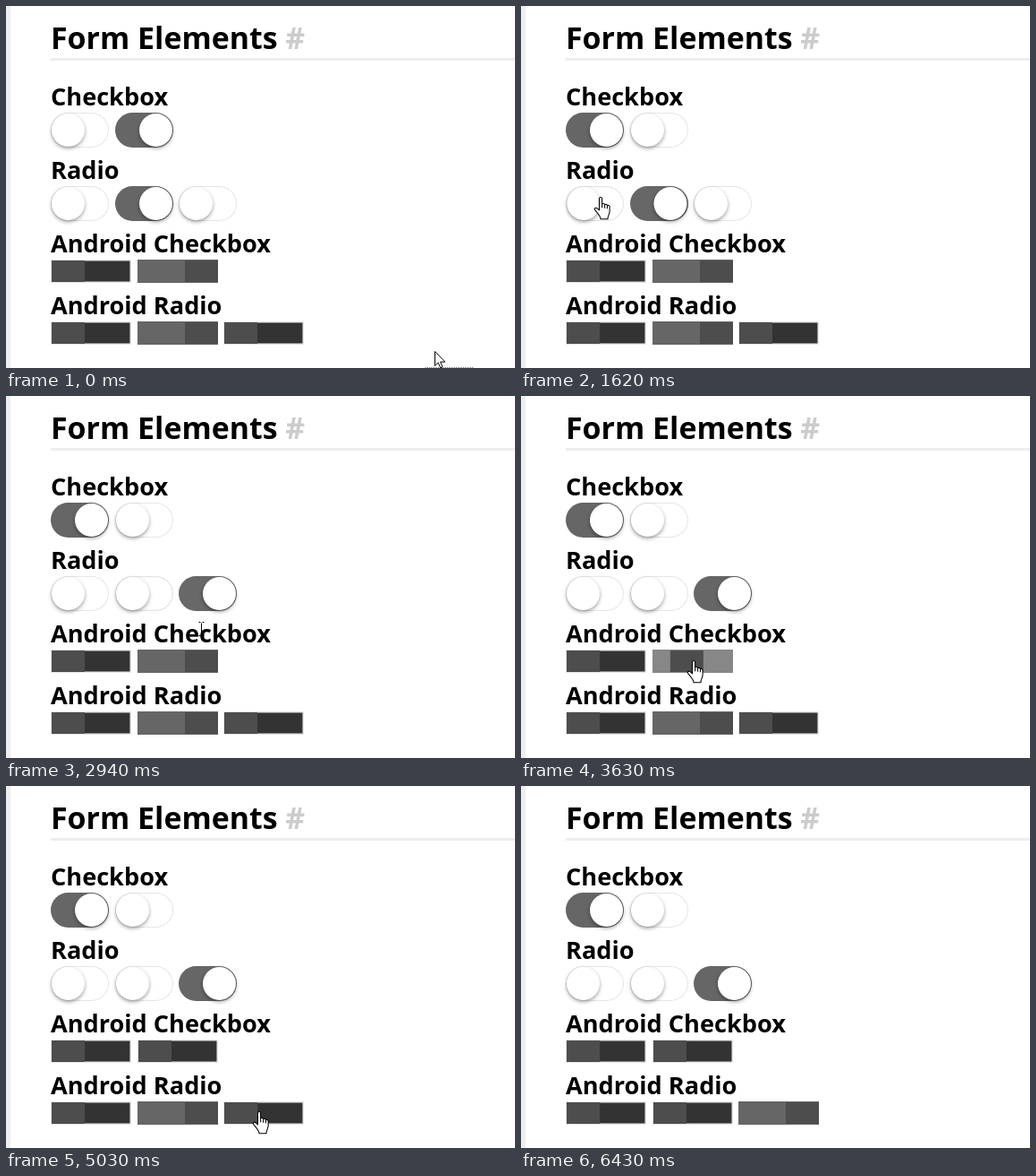
Write an HTML page that moves like this. It is 569 px wide and 404 px high and loops after 6.74 s.

```html
<!DOCTYPE html>
<html lang="en">
<head>
<meta charset="utf-8">
<title>Form Elements</title>
<style>
html, body { margin: 0; width: 100%; height: 100%; overflow: hidden; background: #fff; }
svg { display: block; }
text { font-family: "Open Sans", "Noto Sans", sans-serif; font-weight: 700; font-size: 27.15px; }
.title { font-size: 33.9px; }
.knob { filter: drop-shadow(0 2px 2px rgba(0, 0, 0, .38)); }
.pointer path { stroke: #000; stroke-width: 1; stroke-linejoin: round; fill: #fff; }
.pointer .line { fill: none; }
</style>
</head>
<body>
<svg id="stage" width="569" height="404" viewBox="0 0 569 404">
  <rect width="569" height="404" fill="#fff"/>
  <rect width="5" height="404" fill="#eee"/>
  <rect x="50" y="58" width="519" height="3" fill="#eee"/>
  <text class="title" x="50" y="47.5">Form Elements <tspan fill="#ccc">#</tspan></text>
  <g id="form"></g>
  <path id="focus" d="M469 403.5H522" stroke="#777" stroke-dasharray="1 1"/>
  <g id="arrow" class="pointer">
    <path d="M.5 .5V16.5L4.2 13.1L6.7 18.8L9 17.8L6.6 12.2H11.8Z"/>
  </g>
  <g id="hand" class="pointer">
    <path transform="translate(0 -1) scale(1.06)" d="M-.5 14V2.2C-.5 0 2.5 0 2.5 2.2V8C2.5 6.5 5.3 6.7 5.3 8.5C5.5 7.5 8 7.6 8 9.4C8.3 8.4 10.5 8.8 10.5 10.6V15C10.5 18.5 8.5 19.5 8.5 23.3H1C1 20.5-2 17.5-5 13.8C-6.2 12-4 10.8-2.6 12.2ZM2.5 8V11.5M5.3 8.5V12M8 9.4V12.5"/>
  </g>
  <g id="beam" class="pointer">
    <path class="line" d="M-2.5-7.5H-.5M1.5-7.5H3.5M.5-6.5V6.5M-2.5 7.5H-.5M1.5 7.5H3.5"/>
  </g>
</svg>
<script>
const LOOP = 6740, FADE = 600, SLIDE = 300, PRESS = 70;
const NS = 'http://www.w3.org/2000/svg';
const $ = id => document.getElementById(id);
const mix = (a, b, p) => a + (b - a) * p;
const clamp = p => Math.min(1, Math.max(0, p));

function set(el, attrs) {
  for (const k in attrs) el.setAttribute(k, attrs[k]);
}

function make(tag, attrs) {
  const el = document.createElementNS(NS, tag);
  set(el, attrs);
  $('form').append(el);
  return el;
}

// cubic-bezier(.25, .1, .25, 1)
function ease(x) {
  if (x <= 0 || x >= 1) return clamp(x);
  const curve = (a, b, u) => 3 * a * u * (1 - u) ** 2 + 3 * b * u * u * (1 - u) + u ** 3;
  let lo = 0, hi = 1;
  for (let i = 0; i < 20; i++) {
    const mid = (lo + hi) / 2;
    if (curve(.25, .25, mid) < x) lo = mid; else hi = mid;
  }
  return curve(.1, 1, lo);
}

class Switch {
  constructor(row, i) {
    const { y, round } = row;
    const x = Math.round(50 + i * (round ? 71.5 : 96.5));
    const w = round ? 65 : 90, h = round ? 39 : 26;
    Object.assign(this, { row, x, y, w, h, on: i === 1 ? 1 : 0, changes: [] });
    this.first = this.on;
    this.track = make('rect', { x, y, width: w, height: h, rx: round ? h / 2 : 0 });
    this.hole = make('rect', { fill: round ? '#fff' : '#333' });
    this.knob = make('rect', {
      y: y + 1, width: 37, height: h - 2, rx: round ? 18.5 : 0,
      fill: round ? '#fff' : '#4d4d4d', class: round ? 'knob' : ''
    });
  }

  turn(on, time) {
    if (on === this.on) return;
    this.on = on;
    this.changes.push(time);
  }

  // Each change starts from wherever the last one had got to.
  level(t, span) {
    let from = this.first, to = from, start = -LOOP;
    const at = time => mix(from, to, ease((time - start) / span));
    for (const c of this.changes.filter(c => c <= t)) {
      from = at(c);
      to = 1 - to;
      start = c;
    }
    return at(t);
  }

  draw(t) {
    const { x, y, w, h } = this, { round } = this.row;
    const fade = this.level(t, FADE), grey = Math.round(mix(230, 102, fade));
    const inset = mix(round ? 1 : 1.5, 21, fade), room = h - 2 * inset;
    set(this.track, { fill: `rgb(${grey},${grey},${grey})` });
    set(this.hole, {
      x: x + inset, y: y + inset, rx: round ? Math.max(0, room / 2) : 0,
      width: w - 2 * inset, height: Math.max(0, room)
    });
    set(this.knob, { x: x + mix(1, w - 37 - (round ? 1 : 0), this.level(t, SLIDE)) });
  }
}

const rows = [
  { name: 'Checkbox', y: 119, round: true, count: 2 },
  { name: 'Radio', y: 201, round: true, count: 3 },
  { name: 'Android Checkbox', y: 283, round: false, count: 2 },
  { name: 'Android Radio', y: 352, round: false, count: 3 }
];
for (const row of rows) {
  row.label = make('text', { x: 50, y: row.y - 8 });
  row.label.textContent = row.name;
  row.items = Array.from({ length: row.count }, (_, i) => new Switch(row, i));
}
const [check, radio, flatCheck, flatRadio] = rows.map(r => r.items);
const switches = rows.flatMap(r => r.items);

function click(s, time) {
  if (s.row.name.endsWith('Radio')) s.row.items.forEach(o => o.turn(o === s ? 1 : 0, time));
  else s.turn(1 - s.on, time);
}

// Stops of the pointer: when it arrives, how long it stays, where.
const stops = [];
const rest = (time, stay, x, y) => stops.push({ time, stay, x, y });
function press(time, stay, s, dx, dy) {
  rest(time, stay, s.x + dx, s.y + dy);
  click(s, time + PRESS);
}

rest(0, 70, 479, 385);
press(340, 280, check[1], 28, 19);
press(950, 200, check[0], 25, 17);
press(1540, 180, radio[0], 38, 13);
press(2080, 130, radio[1], 21, 13);
press(2370, 490, radio[2], 27, 13);
rest(2940, 0, 218, 260);
rest(3200, 100, 80, 294);
press(3450, 270, flatCheck[1], 45, 13);
press(4190, 290, flatRadio[1], 55, 13);
press(5070, 370, flatRadio[2], 40, 12);
rest(5840, 120, 338, 360);
rest(6110, 0, 370, 339);
rest(6430, LOOP, 515, 430);

function pointerAt(t) {
  const i = stops.findLastIndex(s => s.time <= t);
  const a = stops[i], b = stops[i + 1] || a, leave = a.time + a.stay;
  const p = b === a ? 0 : clamp((t - leave) / (b.time - leave));
  const q = p * p * (3 - 2 * p);
  return [Math.round(mix(a.x, b.x, q)), Math.round(mix(a.y, b.y, q))];
}

function pointerKind(x, y) {
  const inside = (b, w, top, bottom) => x >= b.x && x < b.x + w && y >= top && y < bottom;
  if (switches.some(s => inside(s, s.w, s.y, s.y + s.h))) return 'hand';
  const overText = rows.some(r => inside({ x: 50 }, r.label.getComputedTextLength(), r.y - 35, r.y));
  return overText ? 'beam' : 'arrow';
}

function draw(t) {
  switches.forEach(s => s.draw(t));
  const [x, y] = pointerAt(t), kind = pointerKind(x, y);
  for (const id of ['arrow', 'hand', 'beam']) {
    set($(id), { transform: `translate(${x} ${y})`, visibility: id === kind ? 'visible' : 'hidden' });
  }
  set($('focus'), { visibility: t < 70 ? 'visible' : 'hidden' });
}

const begin = performance.now();
function tick() {
  draw((performance.now() - begin) % LOOP);
  requestAnimationFrame(tick);
}
tick();
</script>
</body>
</html>
```
